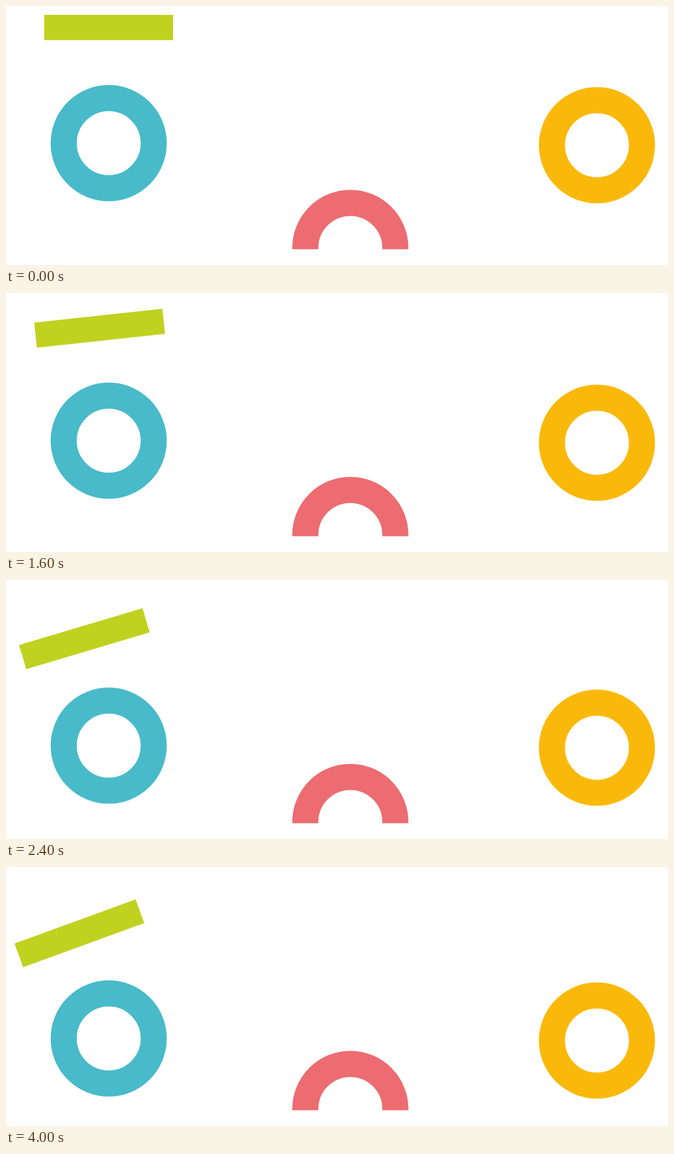
Recreate the animation shown at these times as an HTML page. Size 1197 by 468 pixels, loop 4.04 s.

```html
<!DOCTYPE html>
<html lang="en">
<head>
<meta charset="utf-8">
<title>Rings and bar</title>
<style>
  html, body { margin: 0; width: 100%; height: 100%; overflow: hidden; background: #fff; }
  svg { display: block; width: 1197px; height: 468px; }
  .band { fill: none; stroke-width: 47.2; }

  /* rest for 1 s, glide for 3 s, hold 40 ms, then jump back */
  .drop, .tilt { animation: drop 4040ms linear infinite; }
  .tilt { animation-name: tilt; transform-origin: 185.5px 38.8px; }

  @keyframes drop {
    0% { transform: translateY(0); }
    24.7525% { transform: translateY(0); animation-timing-function: cubic-bezier(.318, 0, .04, 1); }
    99.0099%, 100% { transform: translateY(62px); }
  }
  @keyframes tilt {
    0% { transform: translate(0, 0) rotate(0deg); }
    24.7525% { transform: translate(0, 0) rotate(0deg); animation-timing-function: cubic-bezier(.318, 0, .04, 1); }
    99.0099%, 100% { transform: translate(-52.8px, 81px) rotate(-20deg); }
  }
</style>
</head>
<body>
<svg viewBox="0 0 1197 468">
  <path class="band" stroke="#ec6c71" d="M541.2 439.6V437.2A81.4 81.4 0 0 1 704 437.2V439.6"/>
  <circle class="band drop" stroke="#48bac9" cx="185.7" cy="247.8" r="81.4"/>
  <circle class="band drop" stroke="#fab90a" cx="1068.5" cy="251.6" r="81.4"/>
  <rect class="tilt" fill="#c0d120" x="69" y="16" width="233" height="45.6"/>
</svg>
</body>
</html>
```
